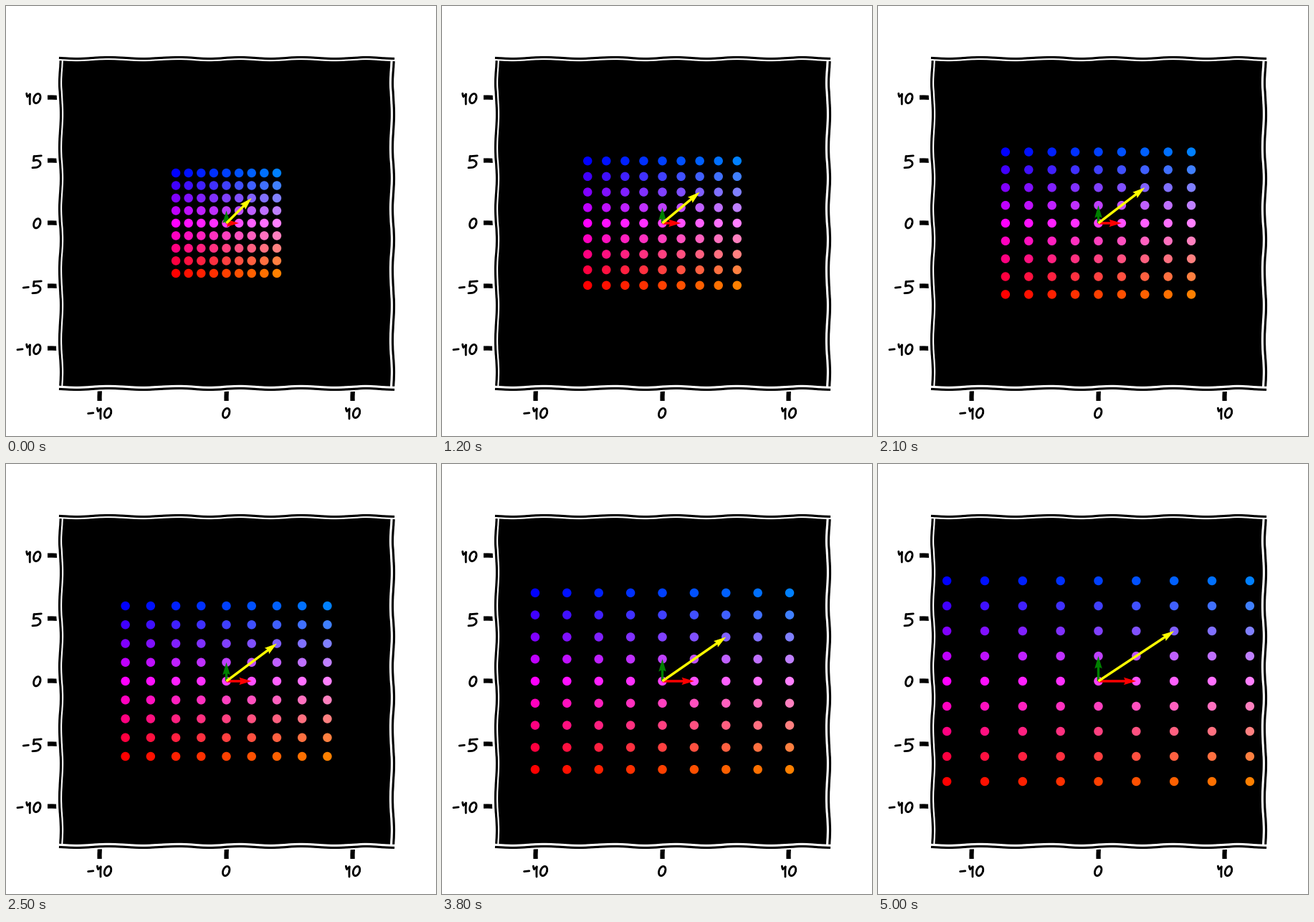
Animation of 600 by 600 pixels, one loop 5100 ms. Source, as a matplotlib script:

```python
import numpy as np
import matplotlib.pyplot as plt
from matplotlib.animation import FuncAnimation
from matplotlib.patches import PathPatch
from matplotlib.path import Path
from matplotlib.transforms import Affine2D

SIZE = 600
FRAMES = 51
LIMIT = 13.2

plt.xkcd()
plt.rcParams["font.family"] = "DejaVu Sans"


def plain(artist):
    """Switch off the hand-drawn wobble and the white outline."""
    artist.set_path_effects([])
    artist.set_sketch_params(None)
    return artist


def smooth(points, steps=8):
    """Catmull-Rom curve through the points."""
    p = np.array(points, float)
    p = np.vstack([2 * p[0] - p[1], p, 2 * p[-1] - p[-2]])
    t = np.linspace(0, 1, steps)[:, None]
    parts = []
    for a, b, c, d in zip(p, p[1:], p[2:], p[3:]):
        parts.append(0.5 * (2 * b + (c - a) * t
                            + (2 * a - 5 * b + 4 * c - d) * t ** 2
                            + (3 * b - a - 3 * c + d) * t ** 3))
    return np.vstack(parts)


def oval(rx, ry, slant):
    a = np.linspace(0, 2 * np.pi, 40)
    y = ry * np.sin(a)
    return np.column_stack([rx * np.cos(a) - slant * y, y])


# Strokes of each character in pixels around its middle, y downwards
GLYPHS = {
    "-": [smooth([(-3.6, 0.6), (0, 0.2), (3.6, -0.2)])],
    "0": [oval(4.5, 6.6, 0.22)],
    "1": [smooth([(-2.6, -7), (-2.2, -4.5), (-1.4, -2.6)]),
          smooth([(-1.4, -2.6), (0.4, -4.2), (2.2, -6)]),
          smooth([(2.2, -6), (1.9, 1), (2, 8)])],
    "5": [smooth([(6, -8.6), (1, -8.2), (-4.2, -7.8)]),
          smooth([(-4.2, -7.8), (-4.6, -4.5), (-5, -1.6)]),
          smooth([(-5, -1.6), (0, -2.4), (4, 0), (4.4, 4),
                  (0.5, 7.4), (-6.4, 8.2)])],
}
STEP_BACK = {"0": 12, "1": 11.8, "5": 15.5}


def label(text, x, y):
    """Write text so that its last character is centred on (x, y)."""
    for char in reversed(text):
        for stroke in GLYPHS[char]:
            move = Affine2D().translate(x, y).scale(1, -1).translate(0, SIZE)
            fig.add_artist(plain(PathPatch(
                Path(stroke), transform=move, fill=False, edgecolor="black",
                linewidth=1.35, capstyle="round", joinstyle="round")))
        x -= STEP_BACK.get(char, 0)


fig, ax = plt.subplots(figsize=(4, 4), dpi=150)
fig.subplots_adjust(left=0.125, right=0.9, bottom=0.11, top=0.88)
ax.set_facecolor("black")
ax.set_xlim(-LIMIT, LIMIT)
ax.set_ylim(-LIMIT, LIMIT)
ax.set_xticks([-10, 0, 10])
ax.set_yticks([-10, -5, 0, 5, 10])
ax.tick_params(labelbottom=False, labelleft=False)

for text, y in [("10", 129), ("5", 217.5), ("0", 303.3),
                ("-5", 392.5), ("-10", 479)]:
    label(text, 43.3, y)
for text, x in [("-10", 142), ("0", 307.2), ("10", 489)]:
    label(text, x, 568)

side = np.arange(-4, 5)
gx, gy = (g.ravel() for g in np.meshgrid(side, side))
grid = np.column_stack([gx, gy])
colors = np.column_stack([np.clip(1 - gy / 4, 0, 1),
                          (gx + 4) / 16,
                          np.clip(1 + gy / 4, 0, 1)])
vectors = np.array([(1, 0), (0, 1), (2, 2)])

dots = plain(ax.scatter(gx, gy, s=20, c=colors, linewidths=1.5, zorder=1))
arrows = plain(ax.quiver(np.zeros(3), np.zeros(3), *vectors.T,
                         color=["red", "green", "yellow"], angles="xy",
                         scale_units="xy", scale=1, width=0.0075, zorder=1.1))
ax.set_xlim(-LIMIT, LIMIT)
ax.set_ylim(-LIMIT, LIMIT)


def update(i):
    t = i / (FRAMES - 1)
    stretch = np.array([1 + 2 * t, 1 + t])
    dots.set_offsets(grid * stretch)
    arrows.set_UVC(*(vectors * stretch).T)
    return dots, arrows


anim = FuncAnimation(fig, update, frames=FRAMES, interval=100, repeat=True)
plt.show()
```
